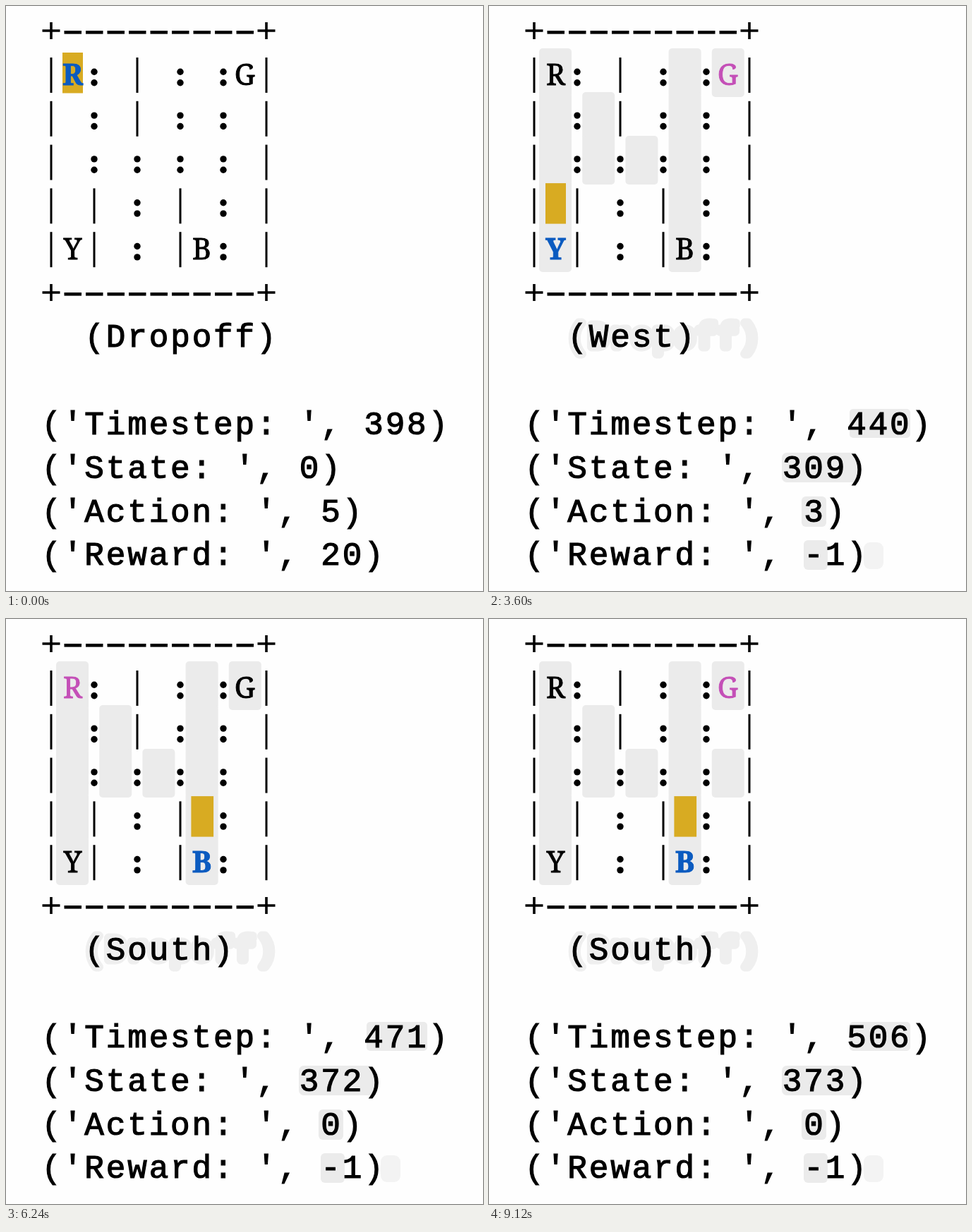
These frames come from a looping animation (676x829 px, 9200 ms). An HTML page:

```html
<!DOCTYPE html>
<html lang="en">
<head>
<meta charset="utf-8">
<title>Taxi grid world</title>
<style>
  html, body { margin: 0; width: 100%; height: 100%; overflow: hidden; background: #fefefe; }
  svg { display: block; width: 676px; height: 829px; }
  text { white-space: pre; fill: currentColor; stroke: currentColor; stroke-width: 1.2; }
  .line { font: 46px "Liberation Mono", "Courier New", monospace; letter-spacing: 2.85px; }
  .stop { font: 41px "Noto Serif", serif; text-anchor: middle; stroke-width: 0.9; }
  .smear { color: #efefef; stroke-width: 13; stroke-linejoin: round; }
</style>
</head>
<body>
<svg id="stage" viewBox="0 0 676 829"></svg>
<script>
const STEP = 80, LOOP = 9200, FIRST = 398;
const PITCH = 30.5, LEAD = 61.8;
const SHADE = "#ebebeb", YELLOW = "#d8ab22", GREEN = "#049847";
const HELD = [2, 17, 36, 55, 76, 95]; // ticks that repeat the previous step
const MAP = [
  "|R: | : :G|",
  "| : | : : |",
  "| : : : : |",
  "| | : | : |",
  "|Y| : |B: |"
];
const STOPS = [[0, 0, "R"], [0, 4, "G"], [4, 0, "Y"], [4, 3, "B"]];
const MOVES = "SNEWPD";
const NAMES = ["South", "North", "East", "West", "Pickup", "Dropoff"];
const ABOARD = 4;

// row, column, passenger, destination, moves
const EPISODES = [
  [0, 0, 4, 0, "D"],
  [1, 3, 2, 1, "SWWWSSPNNEEENNED"],
  [1, 3, 0, 1, "SWWNWNDPSSEEENNED"],
  [4, 4, 2, 1, "WNWNWWWSWSPNNEEENNED"],
  [0, 0, 3, 0, "SSEEESSPNNWWWNND"],
  [2, 0, 3, 0, "EEESSPNNWWWNND"],
  [1, 4, 0, 1, "SWWWWNNPSSDEEENNNED"],
  [0, 0, 3, 1, "SSEEES"]
];

function simulate() {
  const steps = [], trail = new Set();
  let fined = false;
  for (let [row, col, pass, dest, moves] of EPISODES) {
    for (const move of moves) {
      let reward = -1;
      const at = STOPS.findIndex(([r, c]) => r === row && c === col);
      if (move === "S") row = Math.min(4, row + 1);
      if (move === "N") row = Math.max(0, row - 1);
      if (move === "E" && MAP[row][2 * col + 2] === ":") col++;
      else if (move === "W" && MAP[row][2 * col] === ":") col--;
      if (move === "P") {
        if (at === pass) pass = ABOARD;
        else reward = -10;
      }
      if (move === "D") {
        if (pass === ABOARD && at === dest) { pass = dest; reward = 20; }
        else reward = -10;
      }
      fined = fined || reward === -10;
      trail.add(row * 5 + col);
      for (const i of [pass, dest])
        if (i < ABOARD) trail.add(STOPS[i][0] * 5 + STOPS[i][1]);
      steps.push({
        row, col, pass, dest, reward, fined,
        action: MOVES.indexOf(move),
        state: ((row * 5 + col) * 5 + pass) * 4 + dest,
        trail: new Set(trail)
      });
    }
  }
  return steps;
}

const stage = document.getElementById("stage");

function add(tag, attrs, parent = stage) {
  const el = document.createElementNS("http://www.w3.org/2000/svg", tag);
  set(el, attrs);
  return parent.appendChild(el);
}
function set(el, attrs) {
  for (const key in attrs) el.setAttribute(key, attrs[key]);
}
const box = (x, y, width, height, fill = "#000", parent = stage, rx = 0) =>
  add("rect", { x, y, width, height, fill, rx }, parent);
const show = (el, on) => set(el, { visibility: on ? "visible" : "hidden" });
const charX = i => 64 + PITCH * i;
const baseline = row => 111.5 + 61.9 * row;
const line = (col, row, cls = "line") =>
  add("text", { x: charX(col) - 13.6, y: baseline(row), class: cls });

// pale marks left behind by earlier steps
const cells = Array.from({ length: 25 }, (_, i) =>
  box(71 + 61.2 * (i % 5), 60 + 62 * Math.floor(i / 5), 46, 69, SHADE, stage, 5));
const marks = add("g", {});
box(511, 571, 86, 41, SHADE, marks, 5);
box(415, 633, 108, 42, SHADE, marks, 7);
box(443, 695, 35, 43, SHADE, marks, 6);
box(446, 757, 34, 42, SHADE, marks, 6);
const fineMark = box(531, 760, 28, 38, "#f3f3f3", stage, 9);
const smear = line(2, 6, "line smear");
smear.textContent = "(Dropoff)";

const taxi = box(0, 0, 0, 57.5);
const underline = box(0, 0, 32, 3);

// walls and gates
for (const y of [36, 407]) {
  for (let i = 0; i < 11; i++) {
    const x = charX(i);
    if (i % 10) box(x - 12, y - 1, 24.5, 4.6);
    else add("path", { d: `M${x - 12.5} ${y - 1}h25M${x} ${y - 13}v24`, stroke: "#000", "stroke-width": 3.6 });
  }
}
MAP.forEach((text, row) => [...text].forEach((ch, i) => {
  const x = charX(i);
  if (ch === "|") box(x - 1.5, 73 + LEAD * row, 3, 50);
  if (ch === ":")
    for (const dy of [-7.7, 7.7]) add("circle", { cx: x, cy: 101 + LEAD * row + dy, r: 4.7 });
}));

const letters = STOPS.map(([row, col, name]) => {
  const el = add("text", { x: charX(2 * col + 1), y: baseline(row), class: "stop" });
  el.textContent = name;
  return el;
});
const nameLine = line(2, 6);
const fields = ["Timestep", "State", "Action", "Reward"].map((label, i) => ({ label, el: line(0, 8 + i) }));

const steps = simulate();

function draw(tick) {
  const n = tick - HELD.filter(h => h <= tick).length;
  const s = steps[n];
  const riding = s.pass === ABOARD;
  const x = 80 + 60.8 * s.col, y = 66 + 61.7 * s.row;

  cells.forEach((el, i) => show(el, n && s.trail.has(i)));
  show(marks, n);
  show(smear, n);
  show(fineMark, s.fined);

  set(taxi, { x, y, width: 29 + 0.9 * s.col, fill: riding ? GREEN : YELLOW });
  set(underline, { x, y: y + 56.5 });
  show(underline, riding && MAP[s.row][2 * s.col + 1] === " ");

  letters.forEach((el, i) => {
    el.style.color = i === s.pass ? "#0b5bc0" : i === s.dest ? "#c44fb7" : "#000";
    el.style.fontWeight = i === s.pass ? 700 : 400;
  });

  nameLine.textContent = `(${NAMES[s.action]})`;
  const values = [FIRST + n, s.state, s.action, s.reward];
  fields.forEach(({ label, el }, i) => { el.textContent = `('${label}: ', ${values[i]})`; });
}

const start = performance.now();
let last = -1;
function frame() {
  const tick = Math.floor(((performance.now() - start) % LOOP) / STEP);
  if (tick !== last) draw(last = tick);
  requestAnimationFrame(frame);
}
frame();
</script>
</body>
</html>
```
